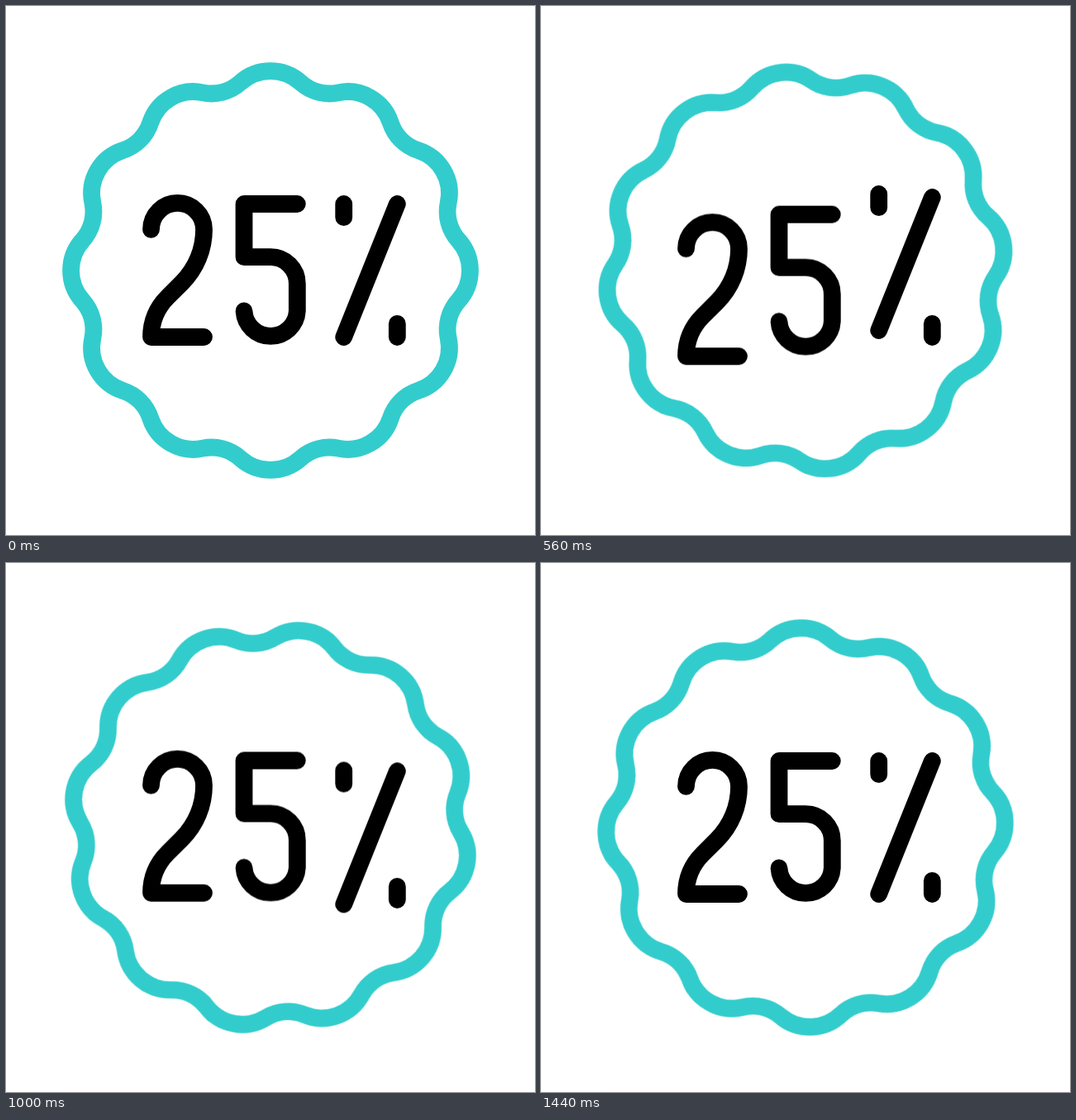
An HTML page that plays this animation: 640 px wide and 640 px high, repeating every 1.48 s.

```html
<!DOCTYPE html>
<html lang="en">
<head>
<meta charset="utf-8">
<title>25% badge</title>
<style>
  html, body { margin: 0; width: 100%; height: 100%; overflow: hidden; background: #fff; }
  svg { display: block; width: 640px; height: 640px; }
  path { fill: none; stroke: #000; stroke-width: 20.8; stroke-linecap: round; stroke-linejoin: round; }
  #badge { stroke: #33cccc; transform-origin: 320px 320px; }
</style>
</head>
<body>
<svg viewBox="0 0 640 640" role="img" aria-label="25%">
  <path id="badge"/>
  <path id="two" d="M175.5 270.4A32 32 0 0 1 239.5 270.4A91 91 0 0 1 212.8 334.8L195.6 352A68.6 68.6 0 0 0 175.5 400.5H239.5"/>
  <path id="five" d="M352.3 239.5H288V303.7H320A32.2 32.2 0 0 1 352.3 336V369A32.2 32.2 0 0 1 288 369"/>
  <path id="tickTop" d="M408.7 239.5V255.7"/>
  <path id="slash" d="M473.3 239.5L408.7 400.5"/>
  <path id="tickLow" d="M473.3 384.4V400.5"/>
</svg>
<script>
const LOOP = 1480, STEP = 40, COUNT = LOOP / STEP;
const $ = id => document.getElementById(id);

// Scalloped ring: 12 lobes joined by inward fillets
function ring() {
  const at = deg => {
    const a = deg * Math.PI / 180;
    return (320 + 230.3 * Math.sin(a)).toFixed(2) + ' ' + (320 - 230.3 * Math.cos(a)).toFixed(2);
  };
  let d = 'M' + at(-9.12);
  for (let a = 0; a < 360; a += 30)
    d += `A54.5 54.5 0 0 1 ${at(a + 9.12)}A52 52 0 0 0 ${at(a + 20.88)}`;
  return d + 'Z';
}

// Eased value between [time, y] keys
function ease(keys, t) {
  if (t <= keys[0][0]) return keys[0][1];
  for (let i = 1; i < keys.length; i++) {
    const [t0, y0] = keys[i - 1], [t1, y1] = keys[i];
    if (t < t1) {
      const u = (t - t0) / (t1 - t0);
      return y0 + (y1 - y0) * u * u * (3 - 2 * u);
    }
  }
  return keys[keys.length - 1][1];
}

// Plays a time-to-transform function in held 40 ms steps
function play(id, pose) {
  const frames = [];
  for (let i = 0; i <= COUNT; i++)
    frames.push({
      offset: i % COUNT ? i / COUNT - 1e-4 : i / COUNT,
      transform: pose(Math.min(i, COUNT - 1) * STEP),
      easing: 'steps(1, end)'
    });
  $(id).animate(frames, { duration: LOOP, iterations: Infinity });
}

const bob = (id, times, up, down) => {
  const ys = [0, up, down, 0];
  const keys = times.map((t, i) => [t, ys[i]]);
  play(id, t => `translate(0px, ${ease(keys, t).toFixed(3)}px)`);
};

$('badge').setAttribute('d', ring());
play('badge', t => `rotate(${60 * t / LOOP}deg)`);
bob('two', [80, 560, 1000, 1320], 23.3, -1.3);
bob('five', [0, 360, 800, 1160], 23.3, -1.3);
bob('tickLow', [0, 290, 830, 1190], -12.8, 12.8);
bob('slash', [40, 410, 955, 1350], -12.8, 12.8);
bob('tickTop', [100, 500, 1080, 1430], -12.8, 12.8);
</script>
</body>
</html>
```
